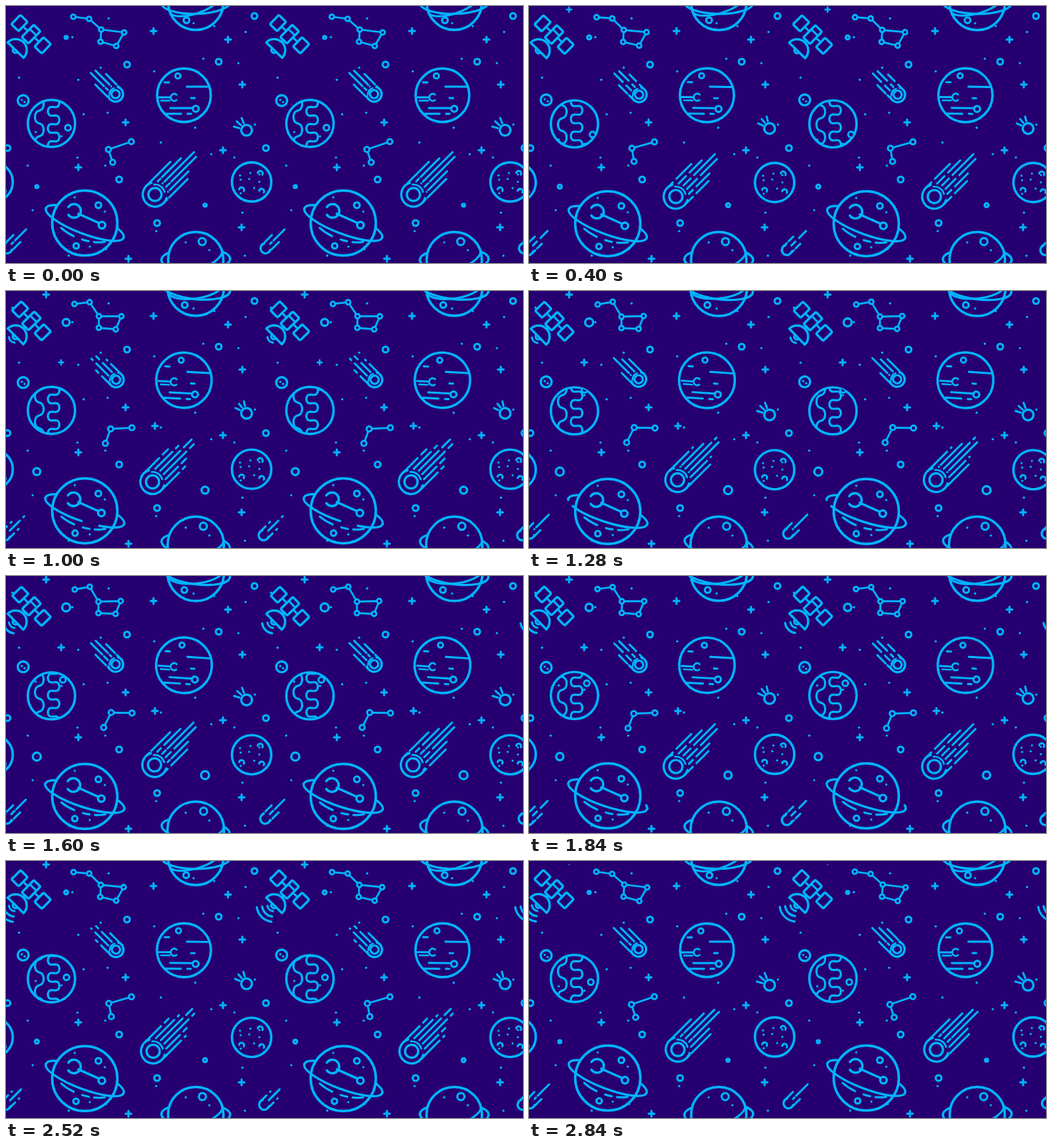
Write an HTML page with a canvas that moves like this. It is 722 by 360 pixels and loops after 2.88 s.

```html
<!DOCTYPE html>
<html lang="en">
<head>
<meta charset="utf-8">
<title>Space pattern</title>
<style>
  html, body { margin: 0; width: 100%; height: 100%; overflow: hidden; background: #260070; }
  canvas { display: block; }
</style>
</head>
<body>
<canvas id="stage" width="722" height="360"></canvas>
<script>
const ctx = document.getElementById('stage').getContext('2d');
const BG = '#260070', INK = '#00b4ff';
const TILE = 361, LOOP = 2880, STEP = 40, TAU = Math.PI * 2, DEG = Math.PI / 180;

const lerp = (a, b, k) => a + (b - a) * k;
const clamp = x => Math.max(0, Math.min(1, x));
const wave = (t, period) => (1 - Math.cos(TAU * t / period)) / 2;

function seeded(seed) {
  return () => (seed = seed * 16807 % 2147483647) / 2147483647;
}
function at(x, y, draw, degrees = 0) {
  ctx.save();
  ctx.translate(x, y);
  ctx.rotate(degrees * DEG);
  draw();
  ctx.restore();
}
function outline(width, filled = false) {
  if (filled) {
    ctx.fillStyle = BG;
    ctx.fill();
    ctx.fillStyle = INK;
  }
  ctx.lineWidth = width;
  ctx.stroke();
}
function line(x1, y1, x2, y2, width = 2.9) {
  ctx.beginPath();
  ctx.moveTo(x1, y1);
  ctx.lineTo(x2, y2);
  outline(width);
}
function arc(r, from, to, width = 3, ry = r) {
  ctx.beginPath();
  ctx.ellipse(0, 0, r, ry, 0, from * DEG, to * DEG);
  outline(width);
}
function ring(x, y, r = 4, width = 3) {
  ctx.beginPath();
  ctx.arc(x, y, r, 0, TAU);
  outline(width, true);
}
function dot(x, y, r = 1.6) {
  ctx.beginPath();
  ctx.arc(x, y, r, 0, TAU);
  ctx.fill();
}
function box(x, w, h) {
  ctx.beginPath();
  ctx.roundRect(x - w / 2, -h / 2, w, h, 2);
  outline(3.3, true);
}
function plus(x, y, size = 1) {
  const arm = 4 * size;
  if (!arm) return;
  line(x - arm, y, x + arm, y, 3 * size);
  line(x, y - arm, x, y + arm, 3 * size);
}
function path(points, width = 3) {
  ctx.beginPath();
  points.forEach(p => ctx.lineTo(...p));
  outline(width);
}

// Dots scattered one per cell of a loose grid over a square of the given size.
function scatter(seed, cells, size, chance, r) {
  const random = seeded(seed), cell = size / cells;
  for (let i = 0; i < cells * cells; i++) {
    const x = (i % cells + 0.15 + random() * 0.7) * cell;
    const y = (Math.floor(i / cells) + 0.15 + random() * 0.7) * cell;
    if (random() < chance) dot(x, y, r);
  }
}

const PLUSES = [[206, 35], [310, 47], [330, 110], [167, 163], [101, 226], [303, 202], [329, 310], [171, 354]];
const TWINKLES = [[56, 5, 150, 2880], [77, 100, 760, 2440], [208, 189, 580, 2440]];
const RINGS = [[169, 82], [297, 78], [347, 14], [158, 243], [211, 304], [2, 199]];
const PULSES = [[84, 44], [43, 253], [278, 279]];

function sky(t, u) {
  scatter(71, 6, 360, 0.8);
  PLUSES.forEach(([x, y]) => plus(x, y));
  TWINKLES.forEach(([x, y, on, off]) => plus(x, y, clamp((t - on) / 300) * clamp((off - t) / 200)));
  RINGS.forEach(([x, y]) => ring(x, y));
  PULSES.forEach(([x, y]) => ring(x, y, lerp(2, 5.7, u), 3.2));
}

function satellite(t, u) {
  at(35 + u * 0.6, 39.5 + u * 3, () => {
    line(-14, 0, 14, 0);
    [-22.5, 22.5].forEach(x => box(x, 14, 18));
    box(0, 13, 24);
    line(-6, -4, 6, -4);
    at(0, 31, () => {
      line(0, -15, 0, -19);
      ctx.beginPath();
      ctx.arc(0, 0, 15.5, Math.PI, TAU);
      ctx.closePath();
      outline(3.3, true);
      arc(4, 0, 180);
    });
  }, 44 + u * 2);
  at(13, 61 + u * 3, () => {
    for (let i = 0; i < 3; i++) {
      if (t >= 560 + i * 820) arc(9 + i * 7.5, 98, 172);
    }
  });
}

// Each star is given by its two extreme positions; links follow the order of the stars.
const DIPPER = [[94, 15, 96, 19], [116, 18, 117, 15], [133, 33, 129, 36],
                [165, 37, 160, 35], [154, 56, 153, 53], [132, 50, 129, 52]];
const TRIO = [[175, 190, 176, 192], [143, 201, 147, 191], [149, 219, 136, 212]];

function constellation(stars, u, r, closeTo) {
  const points = stars.map(([x1, y1, x2, y2]) => [lerp(x1, x2, u), lerp(y1, y2, u)]);
  path(closeTo ? [...points, points[closeTo]] : points, 2.7);
  points.forEach(([x, y]) => ring(x, y, r, 2.8));
}

// Parallel streaks, longest in the middle, each with one gap drifting outward.
function tail(count, w, t) {
  const phase = t % (LOOP / 2) / (LOOP / 2);
  for (let i = 0; i < count; i++) {
    const k = lerp(-1, 1, i / (count - 1)), y = k * w;
    const start = Math.sqrt(w * w - y * y) + 2;
    const end = w * (2.8 + 2.6 * (1 - Math.abs(k)) ** 1.5 - 0.4 * k * (1 - k * k));
    const gap = lerp(start, end, (phase + 0.12 * (i % 2)) % 1);
    if (gap - start > 8) line(start, y, gap - 3.5, y);
    if (end - gap > 4) line(Math.min(gap + 3.5, end), y, end, y);
    if (gap - start <= 8) line(start, y, gap, y);
  }
}
function comet(x, y, degrees, w, streaks, t) {
  at(x, y, () => {
    tail(streaks, w, t);
    arc(w, 62, 298, 3.2);
    if (w < 9) return;
    arc(w * 0.54, 0, 360, 3.2);
    arc(w * 0.82, -50, 30, 2.6);
  }, degrees);
}
function comets(t, v) {
  comet(208 - 5 * v, 264 + 5 * v, -45, 17, 6, t);
  comet(153 + 1.3 * v, 123.5 + 1.3 * v, -135, 10.5, 4, t);
  comet(1.5 - 4 * v, 339.5 + 4 * v, -45, 7, 3, t);
  at(336, 174 - 4 * v, () => {
    ring(0, 0, 7.5, 3.2);
    for (let i = 0; i < 3; i++) {
      at(0, 0, () => line(10.5, 0, 18.5 - 2 * v, 0), 196 + 26 * i + 14 * v);
    }
  });
}

function gasPlanet(u) {
  at(248.5, 125, () => {
    ring(0, 0, 37.5 + u * 1.5, 3.4);
    line(-35, 3, -20, 3);
    line(-32, 7.5, -20, 7.5, 2.4);
    line(-27, -18, -21, -18);
    line(4, -12, 35, -12);
    line(10, 4, 15, 4);
    line(-19, 18, 12, 18);
    line(-26, 26, -4, 26);
    line(5, 26, 10, 26);
    at(-13.5, 3, () => arc(5, 50, 310, 2.7));
    ring(16.5, 19, 4.2);
    ring(-8.5 + u * 4, -27 - u, 3.6, 2.8);
  }, u * 4);
}

// A meandering shoreline that repeats every `period` pixels and scrolls with `drift`.
function coast(x, swing, period, drift, crest) {
  const points = [];
  for (let y = -48; y <= 48; y++) {
    const a = TAU * (y - drift - crest) / period;
    points.push([x + swing * Math.cos(a), y + swing * 0.3 * Math.sin(2 * a)]);
  }
  path(points);
}
function earth(t, u) {
  const drift = 72 * t / LOOP;
  at(63.5, 164.5 + 3.5 * u, () => {
    ring(0, 0, 33, 3.4);
    ctx.save();
    ctx.clip();
    coast(-17, 6, 36, drift, 9);
    coast(3, 8, 24, drift, -5);
    for (let i = -1; i <= 0; i++) {
      const turn = t / LOOP + i;
      ring(23 + 16 * turn, 6 + 64 * turn, 4, 2.8);
      dot(-22, 72 * turn + 12);
      dot(14, 72 * turn + 18);
    }
    ctx.restore();
  });
}

// A globe inside a tilted ring: the far half of the ring lies behind it.
function ringed(x, y, r, a, b, tilt, details, gap = -99) {
  const half = from => at(0, 0, () => {
    const cut = angle => Math.max(from, Math.min(from + 180, angle));
    const before = cut(gap - 13), after = cut(gap + 13);
    if (before > from) arc(a, from, before, 3.2, b);
    if (after < from + 180) arc(a, after, from + 180, 3.2, b);
  }, tilt);
  at(x, y, () => {
    half(180);
    ring(0, 0, r, 3.5);
    details();
    half(0);
  });
}
function saturn(t, u) {
  const tilt = 21 - 3 * u;
  ringed(110, 304 + 5 * u, 45.5, 58, 15, tilt, () => {
    at(-15 - u, -17 + u, () => arc(9.5, 215, 505, 3.4));
    line(-9, -13 + u, 20, u, 3.3);
    ring(24 - u, 3, 4.6, 3.2);
    ring(19, -25 + u, 4);
    ring(-12 - 2 * u, 32 - u, 3.8);
    dot(28, -16);
    dot(-14, -36);
    dot(7, 33);
    at(0, 0, () => {
      arc(46, 40, 62, 3, 23);
      arc(46, 72, 84, 3, 23);
      arc(46, 100, 128, 3, 23);
    }, tilt);
  }, (t - 745) * 0.3);
}
function polarPlanet(u) {
  [-5, 355].forEach(y => ringed(265, y + u * 0.5, 38.5 + u, 48, 16, 9 * u - 1, () => {
    ring(9 + 2 * u, -25 - u, 5);
    ring(-13 - 3 * u, 25 - u, 4);
    dot(-14, -24);
    dot(-3, 29);
    dot(19, -13);
    at(0, 0, () => arc(39, 5, 165, 3, 15), 14 * u - 20);
  }));
}

function moons(u) {
  at(343, 246.5 + 4 * u, () => {
    ring(0, 0, 27.5, 3.4);
    [[12, -12], [-14, 11], [14, 13]].forEach(([x, y]) => at(x, y, () => arc(3.5, 190, 390, 2.8)));
    at(-18, -18, () => scatter(29, 3, 36, 1, 1.5));
  });
  at(24, 132.5 - 5.5 * u, () => {
    ring(0, 0, 7.6, 3.2);
    dot(-2, -1);
    dot(2, 2);
  });
}

function tile(t) {
  const u = wave(t, LOOP), v = wave(t, LOOP / 2);
  sky(t, u);
  satellite(t, u);
  constellation(DIPPER, u, 3.2, 2);
  constellation(TRIO, u, 3.6);
  gasPlanet(u);
  earth(t, u);
  saturn(t, u);
  polarPlanet(u);
  moons(u);
  comets(t, v);
}

function frame(now) {
  const t = Math.floor(now % LOOP / STEP) * STEP;
  ctx.fillStyle = BG;
  ctx.fillRect(0, 0, 722, 360);
  ctx.strokeStyle = ctx.fillStyle = INK;
  ctx.lineCap = ctx.lineJoin = 'round';
  for (let i = -1; i <= 2; i++) at(i * TILE, 0, () => tile(t));
  requestAnimationFrame(frame);
}
requestAnimationFrame(frame);
</script>
</body>
</html>
```
